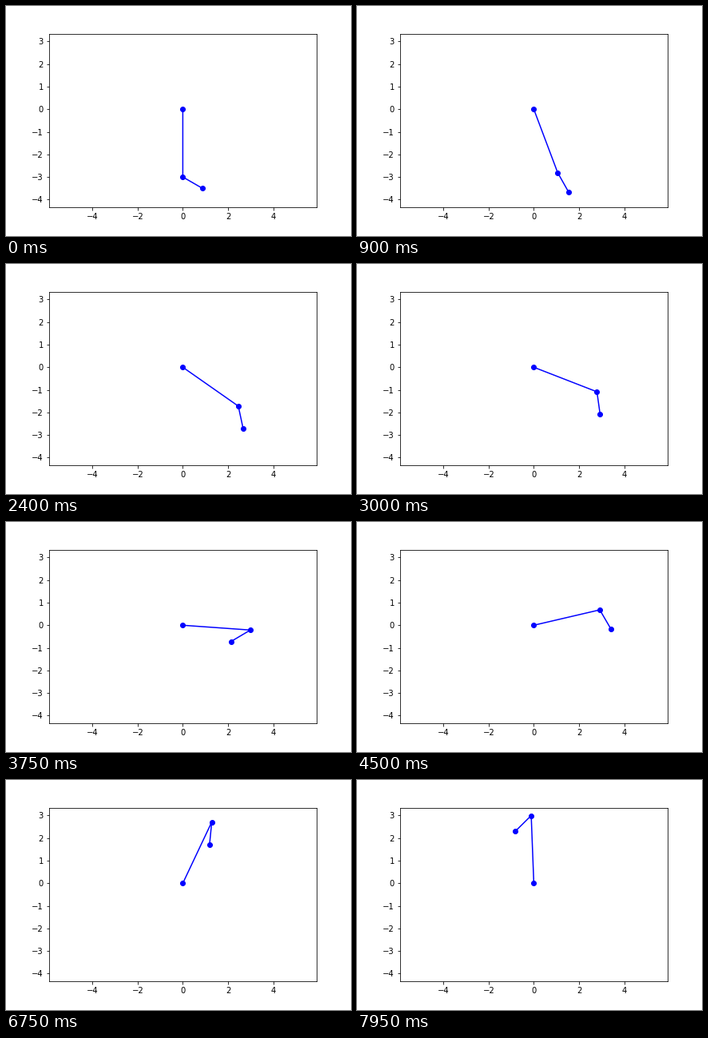
Recreate the animation shown at these times as a matplotlib script. Size 432 by 288 pixels, loop 8 s.

```python
import numpy as np
import matplotlib.pyplot as plt
from matplotlib.animation import FuncAnimation

FRAMES, INTERVAL = 160, 50
DT, SUBSTEPS = 0.1, 10
G, OMEGA = 9.8, 0.2
ARM, ROD = 3.0, 1.0


def deriv(state, t):
    """Pendulum hanging from a pivot that turns at a constant rate."""
    phi, rate = state
    drive = ARM * OMEGA**2 * np.sin(phi - OMEGA * t)
    return np.array([rate, (drive - G * np.sin(phi)) / ROD])


def rk4(state, t, h):
    k1 = deriv(state, t)
    k2 = deriv(state + h / 2 * k1, t + h / 2)
    k3 = deriv(state + h / 2 * k2, t + h / 2)
    k4 = deriv(state + h * k3, t + h)
    return state + h / 6 * (k1 + 2 * k2 + 2 * k3 + k4)


def swing_angles():
    h = DT / SUBSTEPS
    state = np.array([np.pi / 3, 0.0])
    angles = [state[0]]
    for i in range((FRAMES - 1) * SUBSTEPS):
        state = rk4(state, i * h, h)
        if (i + 1) % SUBSTEPS == 0:
            angles.append(state[0])
    return np.array(angles)


theta = OMEGA * DT * np.arange(FRAMES)
phi = swing_angles()
pivot_x, pivot_y = ARM * np.sin(theta), -ARM * np.cos(theta)
bob_x, bob_y = pivot_x + ROD * np.sin(phi), pivot_y - ROD * np.cos(phi)

fig = plt.figure(figsize=(6, 4), dpi=72, facecolor="white")
ax = fig.add_axes([0.125, 0.125, 0.775, 0.755])

# Equal scale on both axes
low, high = -4.34, 3.35
half = (high - low) / 2 * (6 * 0.775) / (4 * 0.755)
ax.set_xlim(-half, half)
ax.set_ylim(low, high)
ax.set_xticks(range(-4, 5, 2))
ax.set_yticks(range(-4, 4))

line, = ax.plot([], [], "o-", color="blue", lw=1.5, ms=6)


def draw(i):
    line.set_data([0, pivot_x[i], bob_x[i]], [0, pivot_y[i], bob_y[i]])
    return line,


anim = FuncAnimation(fig, draw, frames=FRAMES, interval=INTERVAL,
                     repeat=True, repeat_delay=0)
plt.show()
```
